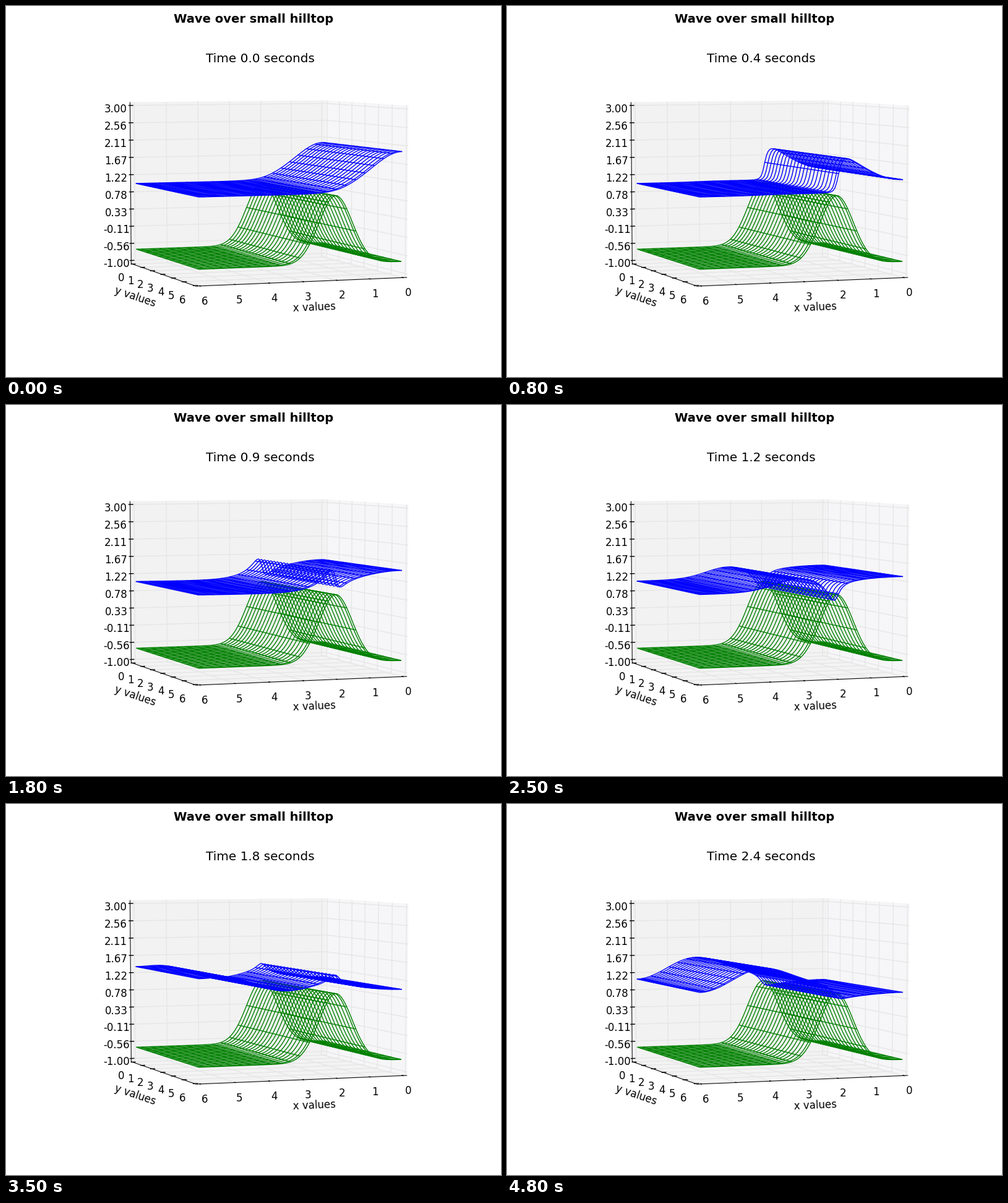
A matplotlib script that plays this animation: 800x600 px, repeating every 4.9 s.

```python
import numpy as np
import matplotlib.pyplot as plt
from matplotlib.animation import FuncAnimation
from matplotlib.collections import LineCollection

plt.rcParams["font.family"] = "DejaVu Sans"

FRAMES, FRAME_DT = 49, 0.05
CELLS, STRIDE, SUBSTEPS = 108, 5, 6
LENGTH, GRAVITY = 6.0, 9.81
HALF = 0.5 + 1 / 48          # axes box, slightly wider than the data cube
OFF = 0.079                  # distance of tick labels from the cube
AZIM, ELEV = np.radians(70), np.radians(5)


def project(x, y, z):
    """Perspective view of a unit cube centred on the origin, in pixels."""
    c, s = np.cos(AZIM), np.sin(AZIM)
    ce, se = np.cos(ELEV), np.sin(ELEV)
    x, y, z = np.broadcast_arrays(x, y, z)
    depth = 10 - (ce * (c * x + s * y) + se * z)
    right = -s * x + c * y
    up = ce * z - se * (c * x + s * y)
    return np.stack([418.38 + 3351.35 * right / depth,
                     293.51 - 2594.6 * up / depth], axis=-1)


def unit(v):
    return v / LENGTH - 0.5


def unit_z(z):
    return (z - 1) / 4


# Wave equation with variable depth and reflecting ends
x = np.linspace(0, LENGTH, CELLS + 1)
bottom = -0.7 + 1.65 * np.exp(-2 * (x - 2) ** 2)


def simulate():
    dx, dt = x[1] - x[0], FRAME_DT / SUBSTEPS
    q = GRAVITY * (1 - bottom)
    q_mid = (q[1:] + q[:-1]) / 2

    def accel(u):
        flux = q_mid * np.diff(u) / dx
        a = np.empty_like(u)
        a[1:-1] = np.diff(flux) / dx
        a[0], a[-1] = 2 * flux[0] / dx, -2 * flux[-1] / dx
        return a

    prev = np.exp(-x ** 2 / 1.6)
    cur = prev + dt ** 2 / 2 * accel(prev)
    states = []
    for step in range(1, FRAMES * SUBSTEPS + 1):
        if step % SUBSTEPS == 0:
            states.append(1 + cur)
        prev, cur = cur, 2 * cur - prev + dt ** 2 * accel(cur)
    return states


waves = simulate()

picks = np.append(np.arange(0, CELLS, STRIDE), CELLS)
ux, rows = unit(x), unit(x[picks])


def wireframe(height):
    z = unit_z(height)
    along = [project(ux, y, z) for y in rows]
    across = [project(ux[i], np.array([-0.5, 0.5]), z[i]) for i in picks]
    return along + across


fig = plt.figure(figsize=(8, 6), dpi=100, facecolor="white")
ax = fig.add_axes([0, 0, 1, 1])
ax.set(xlim=(0, 800), ylim=(600, 0))
ax.axis("off")


def lines(points, color, width, order):
    art = LineCollection([project(*np.transpose(p)) for p in points],
                         colors=color, linewidths=width, zorder=order)
    ax.add_collection(art)


def label(text, pos, size=12, **kw):
    return ax.text(*pos, text, fontsize=size, ha="center", zorder=6, **kw)


# Panes
h = HALF
for corners, color in (
    ([(-h, -h, -h), (-h, h, -h), (-h, h, h), (-h, -h, h)], "#f6f6f8"),
    ([(-h, -h, -h), (h, -h, -h), (h, -h, h), (-h, -h, h)], "#f2f2f2"),
    ([(-h, -h, -h), (h, -h, -h), (h, h, -h), (-h, h, -h)], "#f3f3f3"),
):
    ax.fill(*project(*np.transpose(corners)).T, color=color, lw=0, zorder=1)

# Grid, ticks and tick labels
grid, ticks = [], []
out, inn = h + 0.1 / 12, h - 0.2 / 12
drop = np.array([0, 12])
for n in range(7):
    p = unit(n)
    grid += [[(p, h, -h), (p, -h, -h), (p, -h, h)],
             [(h, p, -h), (-h, p, -h), (-h, p, h)]]
    ticks += [[(p, out, -h), (p, inn, -h)], [(out, p, -h), (inn, p, -h)]]
    label(str(n), project(p, 0.5 + OFF, -0.5 - OFF) + drop)
    label(str(n), project(0.5 + OFF, p, -0.5 - OFF) + drop)
for value in np.linspace(-1, 3, 10):
    p = unit_z(value)
    grid.append([(h, -h, p), (-h, -h, p), (-h, h, p)])
    ticks.append([(out, -h, p), (inn, -h, p)])
    label(f"{value:.2f}", project(0.5 + OFF, -0.5 - OFF, p) + drop)

lines(grid, "#e6e6e6", 1, 2)
lines([[(h, -h, h), (h, -h, -h), (h, h, -h), (-h, h, -h)]], "black", 0.75, 3)
lines(ticks, "black", 1, 3)

label("x values", (498, 487.5), va="center", rotation=2.4)
label("y values", (209, 471), va="center", rotation=-18.8)
label("Wave over small hilltop", (400.5, 27), 14, weight="bold")
clock = label("", (410.5, 91), 14.4)

hill = LineCollection(wireframe(bottom), colors="#008000", linewidths=1, zorder=4)
water = LineCollection(wireframe(waves[0]), colors="#0000ff", linewidths=1, zorder=5)
ax.add_collection(hill)
ax.add_collection(water)


def update(n):
    water.set_segments(wireframe(waves[n]))
    clock.set_text(f"Time {n * FRAME_DT:.1f} seconds")
    return water, clock


anim = FuncAnimation(fig, update, frames=FRAMES, interval=100, repeat=True,
                     repeat_delay=0, blit=False)
plt.show()
```
